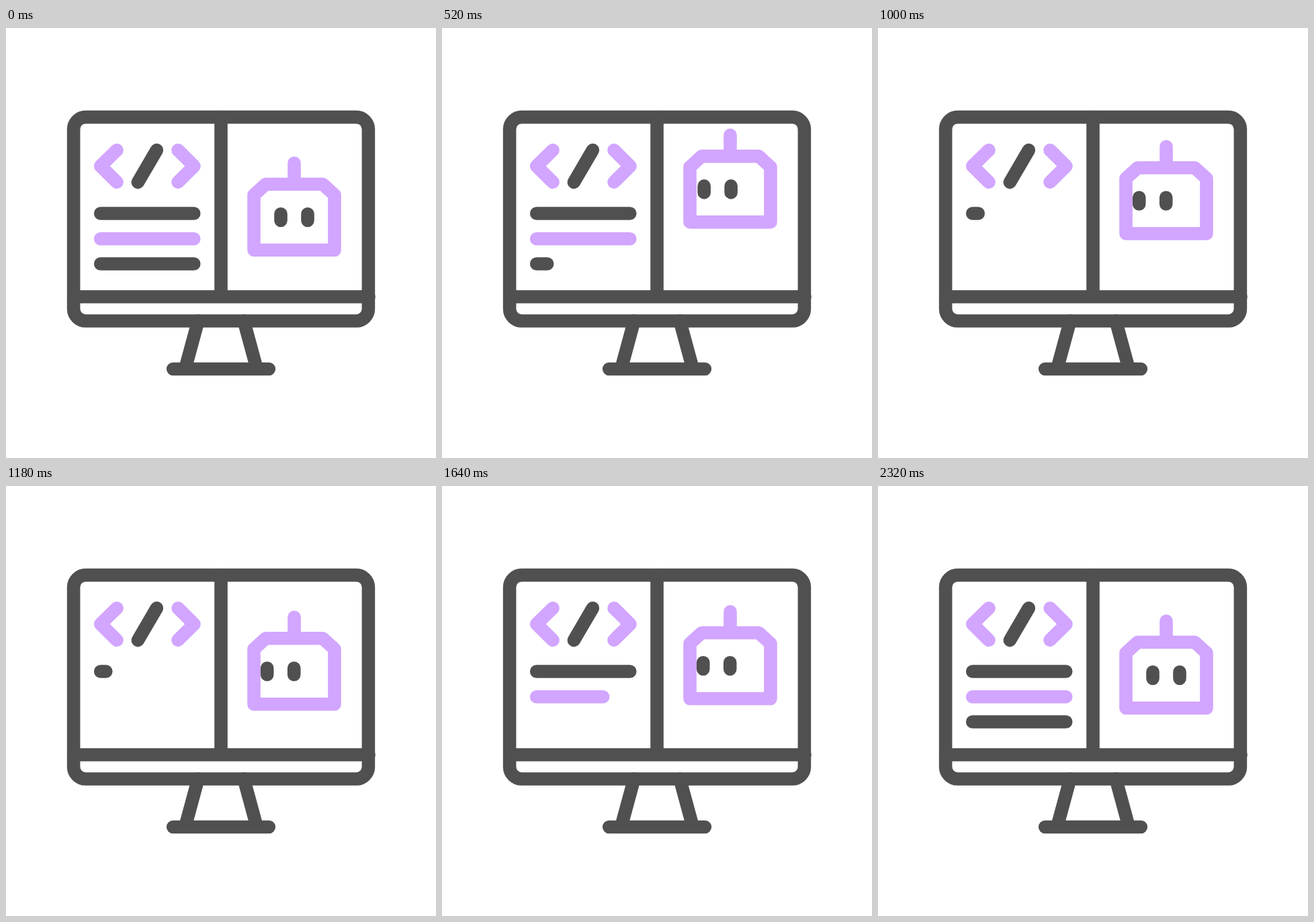
An HTML page that plays this animation: 640 by 640 pixels, repeating every 2400 ms.

```html
<!DOCTYPE html>
<html lang="en">
<head>
<meta charset="utf-8">
<title>Coding robot</title>
<style>
  html, body { margin: 0; height: 100%; overflow: hidden; background: #fff; }
  svg { display: block; width: 100vw; height: 100vh; }
  path, rect { fill: none; stroke: #505050; stroke-width: 19.6; stroke-linecap: round; stroke-linejoin: round; }
  .accent { stroke: #d2a5ff; }
</style>
</head>
<body>
<svg viewBox="0 0 640 640">
  <path d="M286 436L266.7 507M354 436L373.3 507M248.7 507.5H391.3"/>
  <rect x="100.6" y="132.6" width="438.8" height="303.4" rx="18"/>
  <path d="M100.6 400H540M320 132.6V400"/>
  <path class="accent" d="M165 181.8L140.7 205.6L165 229.4M256 181.8L280 205.6L256 229.4"/>
  <path d="M224.3 181.8L196.3 229.6"/>
  <path class="line" data-y="276"/>
  <path class="line accent" data-y="313.7"/>
  <path class="line" data-y="351"/>
  <g id="robot">
    <path class="accent" d="M429 201V232.5M386.5 232.5H471.5L489 248.5V330.5H369V248.5Z"/>
    <path id="eyes" d="M409 276.7V286.5M449 276.7V286.5"/>
  </g>
</svg>
<script>
  const LOOP = 2400, LEFT = 140.7, LENGTH = 139;
  const lines = document.querySelectorAll('.line');
  const robot = document.getElementById('robot');
  const eyes = document.getElementById('eyes');

  const smooth = u => u * u * (3 - 2 * u);
  const linear = u => u;
  const easeIn = power => u => u ** power;
  const easeOut = power => u => 1 - (1 - u) ** power;

  // Each track is a start value followed by [begin, end, value, easing] segments.
  const tracks = {
    lift: [0, [115, 570, -43, smooth], [745, 1310, 0, smooth], [1310, 1540, -21, smooth], [1540, 1800, 0, smooth]],
    look: [0, [320, 560, -20.3, smooth], [2080, 2320, 0, smooth]],
    text: [
      [1, [686, 1160, 0.058, easeOut(5.2)], [1180, 1545, 1, easeIn(5)]],
      [1, [540, 686, 0, linear], [1545, 1680, 1, linear]],
      [1, [0, 540, 0, easeIn(3.4)], [1680, 2320, 1, easeOut(3.4)]]
    ]
  };

  function valueAt([start, ...segments], t) {
    let value = start;
    for (const [begin, end, target, ease] of segments) {
      if (t <= begin) break;
      value += (target - value) * ease(Math.min(1, (t - begin) / (end - begin)));
    }
    return value;
  }

  function draw(now) {
    const t = now % LOOP;
    robot.setAttribute('transform', `translate(0 ${valueAt(tracks.lift, t)})`);
    eyes.setAttribute('transform', `translate(${valueAt(tracks.look, t)} 0)`);
    lines.forEach((line, i) => {
      const amount = valueAt(tracks.text[i], t);
      line.setAttribute('d', amount > 0 ? `M${LEFT} ${line.dataset.y}h${amount * LENGTH}` : '');
    });
  }

  const origin = performance.now();
  function tick() {
    draw(performance.now() - origin);
    requestAnimationFrame(tick);
  }
  tick();
</script>
</body>
</html>
```
